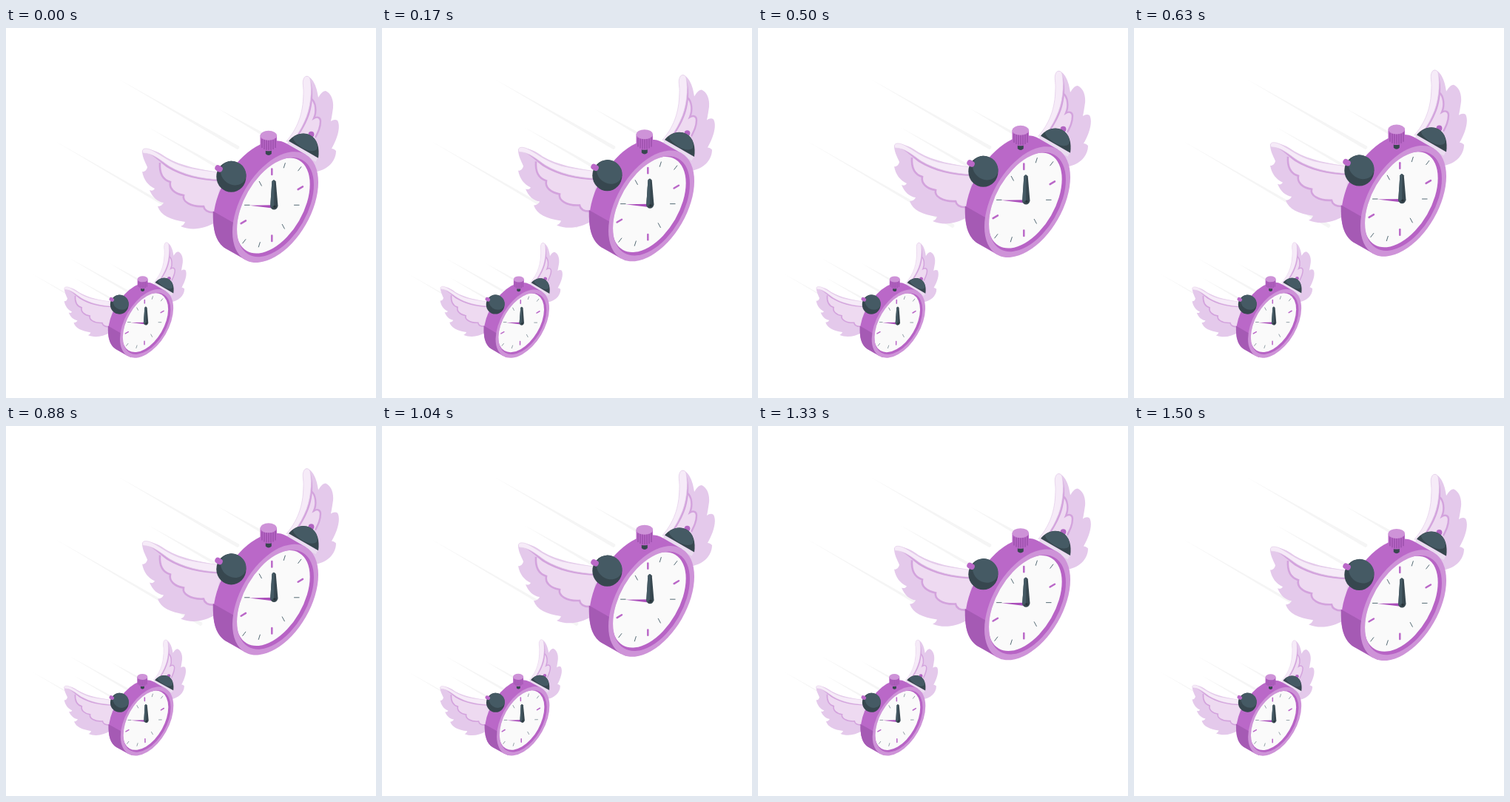
An HTML page that plays this animation: 500 by 500 pixels, repeating every 1540 ms.

```html
<!DOCTYPE html>
<html lang="en">
<head>
<meta charset="utf-8">
<title>Flying clocks</title>
<style>
html, body { margin: 0; width: 100%; height: 100%; overflow: hidden; background: #fff; }
svg { display: block; width: 100vw; height: 100vh; }
</style>
</head>
<body>
<svg viewBox="0 0 500 500">
<defs>
<g id="clock">
  <!-- left wing -->
  <path fill="#e4c9eb" d="M184 166C184 174 188 181 191 188C190 193 186 195 184 194C186 205 192 213 201 217C199 220 197 220 194 219C198 229 205 235 213 236C212 239 208 241 205 241C209 253 222 259 242 262C241 265 239 267 236 268C250 274 268 272 284 262L292 196C262 191 238 187 217 175C204 165 190 161 184 166Z"/>
  <path fill="#eedaf1" d="M208 182C207 197 212 205 222 208C220 217 228 224 240 226C238 234 249 242 267 241C268 246 273 250 284 249L290 203C256 202 232 196 208 182Z"/>
  <path fill="none" stroke="#d3a3dd" stroke-width="2.6" d="M208 182C207 197 212 205 222 208C220 217 228 224 240 226C238 234 249 242 267 241C268 246 273 250 284 249"/>
  <path fill="#d3a3dd" d="M186 168C198 168 209 178 220 185C240 197 262 201 290 203V207C262 206 238 201 217 188C207 180 198 170 186 168Z"/>
  <path fill="#f6ebf8" stroke="#e3cde8" stroke-width=".7" d="M185 169C182 162 190 161 199 166C212 173 222 182 243 188C260 192 276 193 292 196V205C262 204 240 198 221 187C209 179 199 169 185 169Z"/>
  <!-- right wing -->
  <path fill="#e4c9eb" d="M406 65C414 66 420 78 422 94C425 89 428 85 432 85C439 88 443 97 442 108C441 115 440 121 439 126C442 124 445 123 448 125C453 134 447 151 440 163C442 163 444 164 446 166C446 181 433 193 415 195L380 156C400 130 402 107 402 83C401 73 401 67 406 65Z"/>
  <path fill="#eedaf1" d="M412 95C419 100 420 113 416 122C421 119 425 121 425 126C425 134 422 140 418 148L384 155C401 137 411 116 412 95Z"/>
  <path fill="none" stroke="#d3a3dd" stroke-width="2.4" d="M412 95C419 100 420 113 416 122C421 119 425 121 425 126C425 134 422 140 418 148"/>
  <path fill="#d3a3dd" d="M410 67C417 84 415 110 405 129C399 141 393 149 387 155L382 154C402 131 410 104 410 67Z"/>
  <path fill="#f6ebf8" stroke="#e3cde8" stroke-width=".7" d="M402.500 68C404 64 410 64 411 69C414 84 412 109 403 127C398 138 392 147 386 154L379 153C397 132 402 110 402 86C402 78 400 73 402.500 68Z"/>
  <!-- right bell -->
  <g transform="translate(0 .6)">
    <path stroke="#eadcf0" stroke-width="6" d="M381 155L420 177.500"/>
    <circle cx="412.500" cy="143" r="3.900" fill="#b264c2"/>
    <path fill="#37474f" d="M382 152C389 143 401 139 411 144C421 149 424 162 422 175Z"/>
    <path fill="#455a64" d="M388 147C396 141 406 140 414 146C420 151 422 159 420 163C414 169 402 163 396 158C391 154 388 151 388 147Z"/>
  </g>
  <!-- case -->
  <path fill="#ba68c8" d="M405 171L378.500 155.700A82 47.400 -60 0 0 296.500 297.700L323 313Z"/>
  <path fill="#a55ab4" d="M279.800 247.500L308 263.500L330 316L296.500 297.700C284 290 279 272 279.800 247.500Z"/>
  <g id="face"></g>
  <!-- hands -->
  <path fill="#ab4fbb" d="M329 239.800L362 239.200V243.800Z"/>
  <g transform="translate(.2 .4)">
    <path fill="#37474f" d="M359.200 207Q361.800 203 364.500 207L367.300 240Q366 245 362 245Q358 245 357 240Z"/>
    <path fill="#455a64" d="M359.200 207Q361 204 362.500 205L362 239L358 243Q357 242 357 240Z"/>
    <circle cx="363" cy="241" r="1.600" fill="#263238"/>
  </g>
  <!-- left bell -->
  <ellipse cx="304.400" cy="200.800" rx="20.100" ry="21" fill="#37474f"/>
  <ellipse cx="307.300" cy="196" rx="18" ry="15.500" transform="rotate(35 307.300 196)" fill="#455a64"/>
  <path stroke="#ba68c8" stroke-width="8" stroke-linecap="round" d="M286.300 189.200L288.800 190.600"/>
  <!-- crown -->
  <path fill="#37474f" d="M350.800 162H358.800V170Q354.800 174 350.800 170Z"/>
  <path fill="#ba68c8" d="M343.500 145H366V161C362 168 347 168 343.500 161Z"/>
  <path stroke="#9148a2" stroke-width="1.100" d="M346 150V162M349 151V164M352 151V165M355 151V165M358 151V165M361 151V164M364 149V162"/>
  <ellipse cx="354.800" cy="145.200" rx="11.300" ry="6.500" fill="#ce93d8"/>
</g>
<clipPath id="opening"><ellipse cx="364" cy="242" rx="73.500" ry="42.400" transform="rotate(-60 364 242)"/></clipPath>
</defs>
<g id="streaks" fill="#f5f5f5"></g>
<use id="small" href="#clock"/>
<use id="big" href="#clock"/>
</svg>
<script>
const LOOP = 1540;
const $ = id => document.getElementById(id);
const NS = 'http://www.w3.org/2000/svg';

function add(parent, tag, attrs) {
  const el = document.createElementNS(NS, tag);
  for (const k in attrs) el.setAttribute(k, attrs[k]);
  return parent.appendChild(el);
}

// A circle of radius r seen on the right-hand isometric plane
function disc(cx, cy, r, fill, parent = $('face')) {
  return add(parent, 'ellipse', {
    cx, cy, fill, rx: r * Math.sqrt(1.5), ry: r * Math.SQRT1_2,
    transform: `rotate(-60 ${cx} ${cy})`
  });
}

disc(364, 242, 67, '#ce93d8');
disc(364, 242, 60, '#b763c5');
const dial = add($('face'), 'g', { 'clip-path': 'url(#opening)' });
disc(360.7, 240, 57.7, '#fafafa', dial);

// Half of the hour marks; the other half is mirrored through the centre
const marks = [[0, -45], [17, -53.5], [37.5, -49], [38.5, -23], [33.5, 0], [15.5, 29]];
marks.forEach(([x, y], i) => {
  const main = i % 3 === 0;
  const len = Math.hypot(x, y);
  const dx = x / len * 3.7, dy = y / len * 3.7;
  for (const s of [1, -1]) {
    add(dial, 'path', {
      d: `M${359.3 + s * (x - dx)} ${239.2 + s * (y - dy)}l${s * dx * 2} ${s * dy * 2}`,
      stroke: main ? '#ba68c8' : '#546a74',
      'stroke-width': main ? 2.5 : 1,
      'stroke-linecap': main ? 'round' : 'butt'
    });
  }
});

// Tapered speed lines: start x, y, end x, y, end width
[
  [152, 69, 314, 162, 4.5], [285, 108, 348, 144, 3.5],
  [192, 134, 292, 191, 4], [65, 152, 264, 268, 4.5],
  [35, 332, 137, 391, 2.8], [84, 310, 168, 358, 2.8],
  [140, 318, 182, 342, 2.4], [91, 337, 146, 368, 2.6]
].forEach(([x, y, ex, ey, w]) => {
  add($('streaks'), 'path', {
    d: `M${x} ${y}L${ex + w / 4} ${ey - w / 2}Q${ex + w / 2} ${ey} ${ex - w / 4} ${ey + w / 2}Z`
  });
});

const wave = (t, peak) => Math.cos((t - peak) / LOOP * 2 * Math.PI);

function draw(now) {
  const t = now % LOOP;
  const lift = 4.1 + 4.3 * wave(t, 710);
  const tilt = 0.9 * wave(t, 310);
  $('big').setAttribute('transform', `translate(0 ${-lift})`);
  $('small').setAttribute('transform',
    `rotate(${tilt} 161 367) translate(189 398) scale(.62) translate(-362 -240)`);
}

const start = performance.now();
function tick() {
  draw(performance.now() - start);
  requestAnimationFrame(tick);
}
tick();
</script>
</body>
</html>
```
